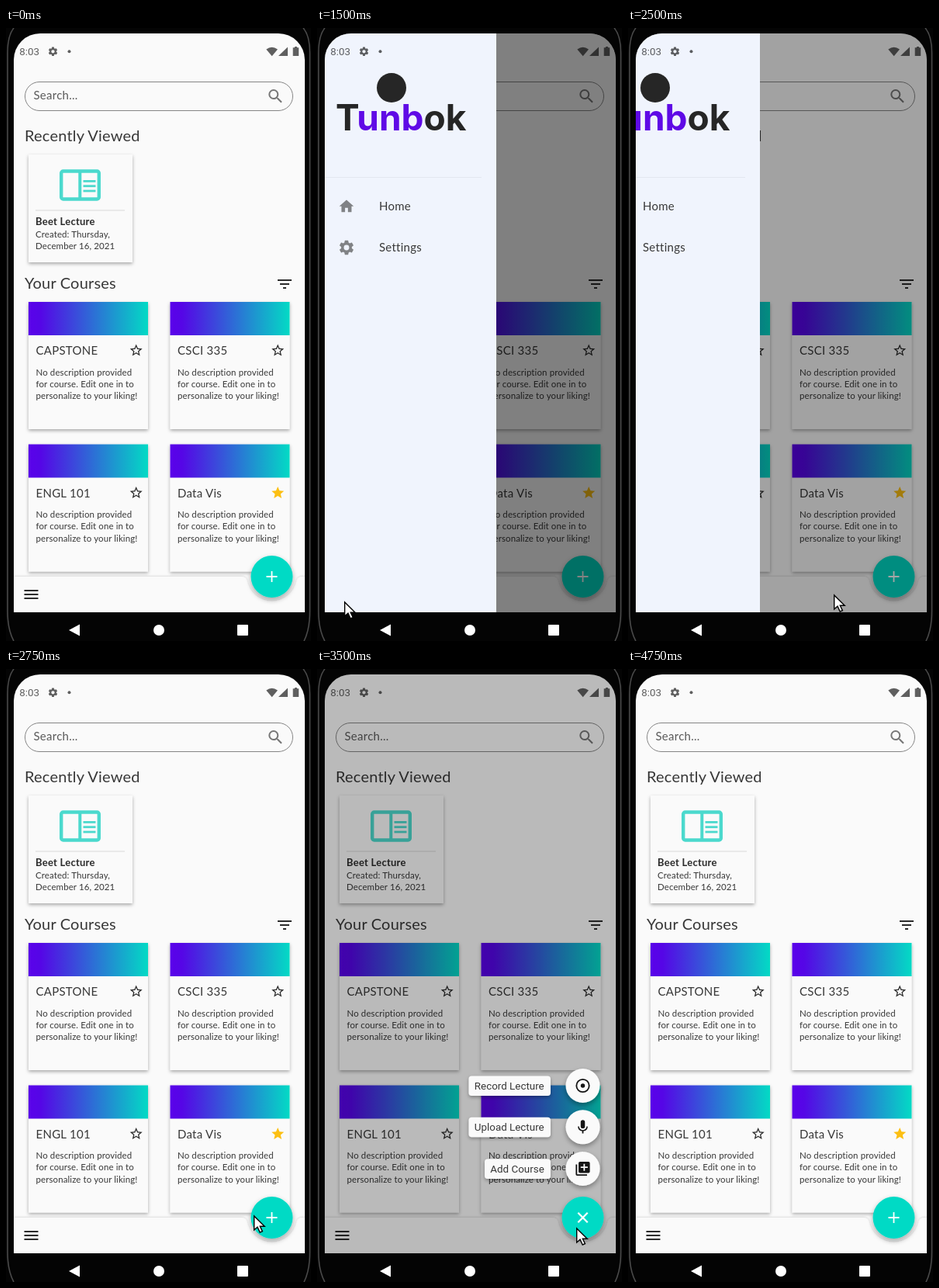
Recreate the animation shown at these times as an HTML page. Size 393 by 790 pixels, loop 5.25 s.

```html
<!DOCTYPE html>
<html lang="en">
<head>
<meta charset="utf-8">
<title>Course app</title>
<style>
  html, body { margin: 0; width: 100%; height: 100%; overflow: hidden; background: #000; }
  svg { display: block; width: 393px; height: 790px; }
  text { font-family: Lato, sans-serif; fill: #383838; white-space: pre; }
  .h { font-size: 20px; letter-spacing: .2px; }
  .t { font-size: 15px; letter-spacing: .26px; }
  .p { font-size: 11.5px; letter-spacing: .1px; }
  .b { font-size: 13px; font-weight: 700; letter-spacing: .25px; fill: #2b2b2b; }
  .ui { font-family: Roboto, sans-serif; font-size: 13.4px; }
  .brand { font-family: Inter, sans-serif; font-size: 46px; font-weight: 700; fill: #262626; }
</style>
</head>
<body>
<svg id="stage" viewBox="0 0 393 790" xmlns="http://www.w3.org/2000/svg"></svg>
<script>
const LOOP = 5250;
const DRAWER_W = 244;

// start time, x, y of the pointer tip
const POINTER = [
  [500, 43, 768], [750, 40, 746], [1000, 35, 739], [1750, 192, 712],
  [2000, 265, 730], [2250, 258, 724], [2500, 265, 730], [2750, 319, 704],
  [3000, 334, 720], [4500, 297, 762], [4750, -50, -50]
];
// start time, share of the drawer that is open
const DRAWER = [[1500, .906], [1750, 1], [2500, .656], [2750, 0]];
const DIAL = [[3500, 1], [4500, 0]];

const ICONS = {
  search: 'M15.5 14h-.79l-.28-.27A6.47 6.47 0 0 0 16 9.5 6.5 6.5 0 1 0 9.5 16c1.61 0 3.09-.59 4.23-1.57l.27.28v.79l5 4.99L20.49 19zm-6 0C7.01 14 5 11.99 5 9.5S7.01 5 9.5 5 14 7.01 14 9.5 11.99 14 9.5 14z',
  filter: 'M10 18h4v-2h-4zM3 6v2h18V6zm3 7h12v-2H6z',
  menu: 'M3 18h18v-2H3zm0-5h18v-2H3zm0-7v2h18V6z',
  home: 'M10 20v-6h4v6h5v-8h3L12 3 2 12h3v8z',
  star: 'M12 17.27 18.18 21l-1.64-7.03L22 9.24l-7.19-.61L12 2 9.19 8.63 2 9.24l5.46 4.73L5.82 21z',
  starLine: 'M22 9.24l-7.19-.62L12 2 9.19 8.63 2 9.24l5.46 4.73L5.82 21 12 17.27 18.18 21l-1.63-7.03zM12 15.4l-3.76 2.27 1-4.28-3.32-2.88 4.38-.38L12 6.1l1.71 4.04 4.38.38-3.32 2.88 1 4.28z',
  target: 'M12 2a10 10 0 1 0 0 20 10 10 0 0 0 0-20zm0 18a8 8 0 1 1 0-16 8 8 0 0 1 0 16zm3-8a3 3 0 1 1-6 0 3 3 0 0 1 6 0z',
  mic: 'M12 14a3 3 0 0 0 3-3V5a3 3 0 0 0-6 0v6a3 3 0 0 0 3 3zm5.3-3a5.3 5.3 0 0 1-10.6 0H5a7 7 0 0 0 6 6.72V21h2v-3.28A7 7 0 0 0 19 11z',
  addCopy: 'M4 6H2v14a2 2 0 0 0 2 2h14v-2H4zm16-4H8a2 2 0 0 0-2 2v12a2 2 0 0 0 2 2h12a2 2 0 0 0 2-2V4a2 2 0 0 0-2-2zm-1 9h-4v4h-2v-4H9V9h4V5h2v4h4z',
  gear: 'M19.14 12.94a7 7 0 0 0 0-1.88l2.03-1.58a.5.5 0 0 0 .12-.61l-1.92-3.32a.5.5 0 0 0-.59-.22l-2.39.96a7 7 0 0 0-1.62-.94L14.4 2.81a.5.5 0 0 0-.48-.41h-3.84a.5.5 0 0 0-.47.41l-.36 2.54a7 7 0 0 0-1.62.94l-2.39-.96a.5.5 0 0 0-.59.22L2.74 8.87a.5.5 0 0 0 .12.61l2.03 1.58a7 7 0 0 0 0 1.88l-2.03 1.58a.5.5 0 0 0-.12.61l1.92 3.32a.5.5 0 0 0 .59.22l2.39-.96a7 7 0 0 0 1.62.94l.36 2.54a.5.5 0 0 0 .48.41h3.84a.5.5 0 0 0 .47-.41l.36-2.54a7 7 0 0 0 1.62-.94l2.39.96a.5.5 0 0 0 .59-.22l1.92-3.32a.5.5 0 0 0-.12-.61zM12 15.6a3.6 3.6 0 1 1 0-7.2 3.6 3.6 0 0 1 0 7.2z'
};

const text = (cls, x, y, str, extra = '') =>
  `<text class="${cls}" x="${x}" y="${y}" ${extra}>${str}</text>`;
const rect = (x, y, w, h, fill, extra = '') =>
  `<rect x="${x}" y="${y}" width="${w}" height="${h}" fill="${fill}" ${extra}/>`;
const circle = (x, y, r, fill, extra = '') =>
  `<circle cx="${x}" cy="${y}" r="${r}" fill="${fill}" ${extra}/>`;
const path = (d, fill, extra = '') => `<path d="${d}" fill="${fill}" ${extra}/>`;
// icon on a 24 unit grid, placed by its middle
const icon = (name, x, y, scale, fill) =>
  path(ICONS[name], fill, `transform="translate(${x - 12 * scale} ${y - 12 * scale}) scale(${scale})"`);

const INK = '#2b2b2b', PAPER = '#fafafa', TEAL = '#03dac5';
const SHADOW = 'filter="url(#shadow)"', HIGH = 'filter="url(#high)"';

function courseCard(x, y, title, starred) {
  const lines = ['No description provided', 'for course. Edit one in to', 'personalize to your liking!'];
  return rect(x, y, 154, 164, PAPER, SHADOW) +
    rect(x, y, 154, 43, 'url(#band)') +
    text('t', x + 9.5, y + 68, title) +
    icon(starred ? 'star' : 'starLine', x + 138.7, y + 62.4, .8, starred ? '#fcbf12' : INK) +
    lines.map((s, i) => text('p', x + 9.5, y + 94.5 + i * 15.4, s)).join('');
}

function recentCard() {
  const bars = [196, 202.3, 208.6].map(y => rect(99.5, y, 16, 2.8, '#4bd9cd')).join('');
  return rect(29, 163, 134, 139, PAPER, SHADOW) +
    rect(71.2, 184.5, 48.6, 36, 'none', 'rx="2.5" stroke="#4bd9cd" stroke-width="4.4"') +
    rect(93.3, 184, 4, 37, '#4bd9cd') + bars +
    rect(38, 234.5, 115, 1, '#d9d9d9') +
    text('b', 38, 253.5, 'Beet Lecture') +
    text('p', 38, 270, 'Created: Thursday,') +
    text('p', 38, 285, 'December 16, 2021');
}

const page = () =>
  rect(10, 7, 375, 746, PAPER) +
  rect(24.5, 69.5, 345, 37, 'none', 'rx="18.5" stroke="#858585"') +
  text('t', 35.5, 92, 'Search...', 'style="fill:#5a5a5a"') +
  icon('search', 347.3, 88, 1, '#777') +
  text('h', 24, 146, 'Recently Viewed') + recentCard() +
  text('h', 24, 336, 'Your Courses') + icon('filter', 359, 330, 1, INK) +
  courseCard(29, 353, 'CAPSTONE') + courseCard(211.5, 353, 'CSCI 335') +
  courseCard(29, 536.5, 'ENGL 101') + courseCard(211.5, 536.5, 'Data Vis', true) +
  path('M10 707H303Q309 707 310.5 712A32.5 32.5 0 0 0 374.5 712Q376 707 382 707H385V753H10Z', PAPER, 'filter="url(#rise)"') +
  icon('menu', 32.5, 730, 1, INK);

function dialItem(y, labelX, label, name) {
  return rect(labelX, y - 12.5, 301 - labelX, 25.5, PAPER, 'rx="4" ' + SHADOW) +
    text('ui', labelX + 7.3, y + 4.8, label) +
    circle(342.5, y, 22, PAPER, HIGH) + icon(name, 342.5, y, .91, '#151515');
}

const drawer = () =>
  rect(-30, 7, 261, 746, '#f0f4fd') +
  circle(96, 77, 19, '#262626') +
  text('brand', 24, 131.5, 'T<tspan fill="#5f0ae6">unb</tspan>ok') +
  rect(6, 192, 206, 1, '#e3e7f0') +
  icon('home', 38, 229.8, .93, '#808285') + text('t', 80, 234.5, 'Home') +
  icon('gear', 38, 283, .96, '#808285') + text('t', 80, 288, 'Settings');

// see-through black, so it darkens with whatever lies below
const status = () => '<g opacity=".62">' +
  text('ui', 17.3, 35.2, '8:03', 'style="fill:#000"') +
  icon('gear', 60.5, 30.3, .6, '#000') + circle(81.5, 30.3, 2, '#000') +
  path('M335.3 27.6Q342.6 21.8 350 27.6L342.7 36.2Z', '#000') +
  path('M363 24.5V36H351Z', '#000') +
  path('M369.7 25.3H372V24H375V25.3H377.2V36H369.7Z', '#000') + '</g>';

const stage = document.getElementById('stage');
stage.innerHTML = `
  <defs>
    <linearGradient id="band"><stop stop-color="#5a02ea"/><stop offset=".1" stop-color="#5506e6"/><stop offset="1" stop-color="${TEAL}"/></linearGradient>
    <filter id="shadow" x="-20%" y="-20%" width="140%" height="150%"><feDropShadow dx="0" dy="2" stdDeviation="2" flood-opacity=".33"/></filter>
    <filter id="high" x="-30%" y="-30%" width="160%" height="170%"><feDropShadow dx="0" dy="3" stdDeviation="3" flood-opacity=".35"/></filter>
    <filter id="rise" x="-5%" y="-20%" width="110%" height="140%"><feDropShadow dx="0" dy="-.5" stdDeviation="1.3" flood-opacity=".16"/></filter>
    <clipPath id="screen"><path d="M10 753V41A34 34 0 0 1 44 7H351A34 34 0 0 1 385 41V753Z"/></clipPath>
  </defs>
  ${rect(0, 0, 393, 790, '#040404')}
  ${path('M10 0Q2 10 2 32V752Q2 775 10 790M383 0Q391.5 10 391.5 32V752Q391.5 775 384 790', 'none', 'stroke="#4a4a4a" stroke-width="1.6"')}
  <g clip-path="url(#screen)">
    ${page()}
    <g id="dial">
      ${rect(10, 7, 375, 746, '#000', 'opacity=".26"')}
      ${dialItem(537, 195.5, 'Record Lecture', 'target')}
      ${dialItem(590.3, 195.5, 'Upload Lecture', 'mic')}
      ${dialItem(644, 216, 'Add Course', 'addCopy')}
    </g>
    ${circle(342.5, 707, 27, TEAL, HIGH)}
    <path id="plus" d="M-7 0H7M0 -7V7" stroke="#fff" stroke-width="1.8"/>
    <rect id="scrim" x="10" y="7" width="375" height="746"/>
    <g id="drawer">${drawer()}</g>
    ${status()}
  </g>
  ${path('M95 768.5V783.5L81 776Z', '#fff')}
  ${circle(197, 776, 7, '#fff')}
  ${rect(298, 769, 14, 14, '#fff', 'rx="1"')}
  <path id="pointer" d="M.7 1V19L5 15.2 8.2 22 11.4 20.6 8.3 14.3H14.2Z" fill="#fff" stroke="#000" stroke-width="1.4"/>`;

const part = id => document.getElementById(id);
const [dial, plus, scrim, drawerPart, pointer] =
  ['dial', 'plus', 'scrim', 'drawer', 'pointer'].map(part);

// values of the last step that has begun
function at(steps, t, first) {
  let value = first;
  for (const [start, ...rest] of steps) if (t >= start) value = rest;
  return value;
}

function draw(t) {
  const [open] = at(DRAWER, t, [0]);
  const [dialOpen] = at(DIAL, t, [0]);
  const [x, y] = at(POINTER, t, [-50, -50]);

  scrim.setAttribute('opacity', .54 * open);
  drawerPart.setAttribute('display', open ? 'inline' : 'none');
  drawerPart.setAttribute('transform', `translate(${DRAWER_W * (open - .906)} 0)`);
  dial.setAttribute('display', dialOpen ? 'inline' : 'none');
  plus.setAttribute('transform',
    `translate(342.5 707) rotate(${45 * dialOpen}) scale(${1 + .25 * dialOpen})`);
  pointer.setAttribute('transform', `translate(${x} ${y})`);
}

const begin = performance.now();
function tick() {
  draw((performance.now() - begin) % LOOP);
  requestAnimationFrame(tick);
}
tick();
</script>
</body>
</html>
```
